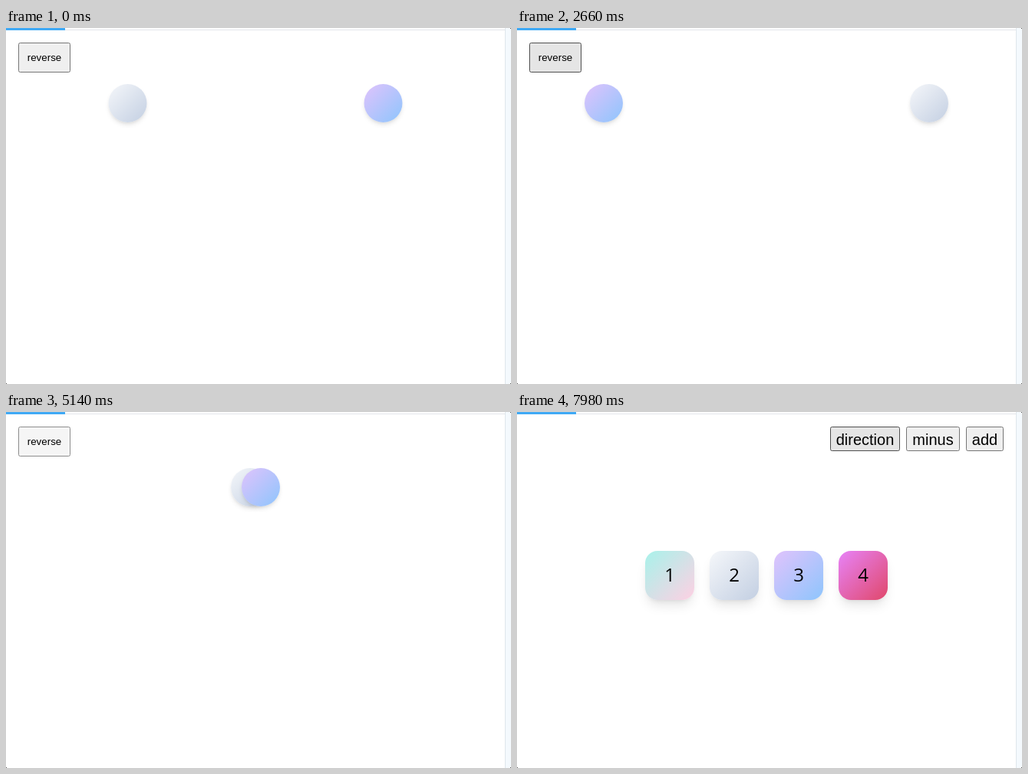
An HTML page for the animation above (8000 ms loop, 658 by 464 pixels).

```html
<!DOCTYPE html>
<html lang="en">
<head>
<meta charset="utf-8">
<title>Reverse</title>
<style>
  html, body { margin: 0; width: 100%; height: 100%; overflow: hidden; background: #fff; }
  #stage { position: relative; width: 658px; height: 464px; overflow: hidden; background: #fff; }
  #stage div { position: absolute; box-sizing: border-box; }

  .track { left: 77px; top: 2px; width: 573px; height: 1px; background: #e3e6ea; }
  .progress { left: 0; top: 0; width: 77px; height: 3px; background: #40a9f5; }
  .side { left: 650px; top: 0; width: 8px; height: 464px; background: #f4f9fd; border-left: 1px solid #dfe6ec; }
  .corner { width: 1px; height: 1px; background: #555; }

  .scene { left: 0; top: 0; width: 658px; height: 464px; }
  .button {
    top: 19px; height: 32px; border: 1px solid #767676; border-radius: 2.5px;
    background: #efefef; color: #000; text-align: center; white-space: nowrap;
    font: 20px/33px "Liberation Sans", Arial, sans-serif;
  }
  .button.hover { background: #e5e5e5; border-color: #4f4f4f; }
  .button.active { background: #f5f5f5; border-color: #8d8d8d; }
  #reverse { left: 16px; width: 68px; height: 39px; font-size: 13.333px; line-height: 37px; }

  .grey { background: linear-gradient(135deg, #f5f7fa, #c3cfe2); }
  .lilac { background: linear-gradient(135deg, #e0c3fc, #8ec5fc); }
  .mint { background: linear-gradient(135deg, #a8f2ea, #fed0e3); }
  .pink { background: linear-gradient(135deg, #e783f8, #e0486b); }

  .ball {
    left: 300px; top: 73px; width: 50px; height: 50px; border-radius: 50%;
    box-shadow: 0 4px 6px -1px rgba(0,0,0,.1), 0 2px 4px -2px rgba(0,0,0,.1);
  }
  .tile {
    top: 181px; width: 64px; height: 64px; border-radius: 16px;
    color: #000; text-align: center;
    font: 24px/61px "Open Sans", "Noto Sans", sans-serif;
    box-shadow: 0 10px 15px -3px rgba(0,0,0,.1), 0 4px 6px -4px rgba(0,0,0,.1);
  }
</style>
</head>
<body>
<div id="stage">
  <div class="track"></div>
  <div class="progress"></div>
  <div class="side"></div>

  <div class="scene" id="swap">
    <div class="button" id="reverse">reverse</div>
    <div class="ball grey" id="grey"></div>
    <div class="ball lilac" id="lilac"></div>
  </div>

  <div class="scene" id="list" hidden>
    <div class="button" id="direction" style="left:408px;width:91px">direction</div>
    <div class="button" style="left:507px;width:70px">minus</div>
    <div class="button" style="left:585px;width:49px">add</div>
    <div class="tile mint" style="left:167px">1</div>
    <div class="tile grey" style="left:251px">2</div>
    <div class="tile lilac" style="left:335px">3</div>
    <div class="tile pink" style="left:419px">4</div>
  </div>

  <div class="corner" style="left:657px;top:0"></div>
  <div class="corner" style="left:0;top:463px"></div>
  <div class="corner" style="left:657px;top:463px"></div>
</div>

<script>
  const LOOP = 8000, STEP = 40, SWITCH = 7220;
  const el = id => document.getElementById(id);

  // Swing of the lilac ball about the centre: time (ms), offset (px), speed (px/s)
  const swing = [
    [980, 166.5, 0], [1260, 139.5, -180], [1850, -56, -410], [2530, -221, 0],
    [2660, -212, 135], [3500, 72, 430], [4290, 235, 0], [5140, 7, -380],
    [5940, -150, -110], [6660, -218, -65], [6950, -228, 0], [7220, -219, 60]
  ];

  // Pointer state of the reverse button from each time on
  const pointer = [
    [0, ''], [500, 'hover'], [940, 'active'], [1020, 'hover'],
    [1780, 'active'], [1860, 'hover'], [3460, 'active'], [3580, 'hover'],
    [5140, 'active'], [5220, 'hover'], [5900, '']
  ];

  // Cubic Hermite curve through the swing points
  function offset(t) {
    if (t <= swing[0][0]) return swing[0][1];
    const i = swing.findIndex(p => p[0] >= t);
    if (i < 0) return swing[swing.length - 1][1];
    const [t0, x0, v0] = swing[i - 1], [t1, x1, v1] = swing[i];
    const d = (t1 - t0) / 1000, u = (t - t0) / (t1 - t0), w = 1 - u;
    return w * w * (1 + 2 * u) * x0 + u * u * (3 - 2 * u) * x1
      + u * w * d * (w * v0 - u * v1);
  }

  function draw(now) {
    const raw = now % LOOP;
    const t = Math.max(0, Math.floor((raw - 20) / STEP) * STEP + 20);
    const swapping = t < SWITCH;
    el('swap').hidden = !swapping;
    el('list').hidden = swapping;
    if (swapping) {
      const x = offset(t);
      el('lilac').style.transform = `translateX(${x}px)`;
      el('grey').style.transform = `translateX(${-x}px)`;
      el('reverse').className = 'button ' + pointer.filter(p => p[0] <= t).pop()[1];
    } else {
      el('direction').className = t >= 7980 ? 'button hover' : 'button';
    }
  }

  const start = performance.now();
  function tick() {
    draw(performance.now() - start);
    requestAnimationFrame(tick);
  }
  tick();
</script>
</body>
</html>
```
